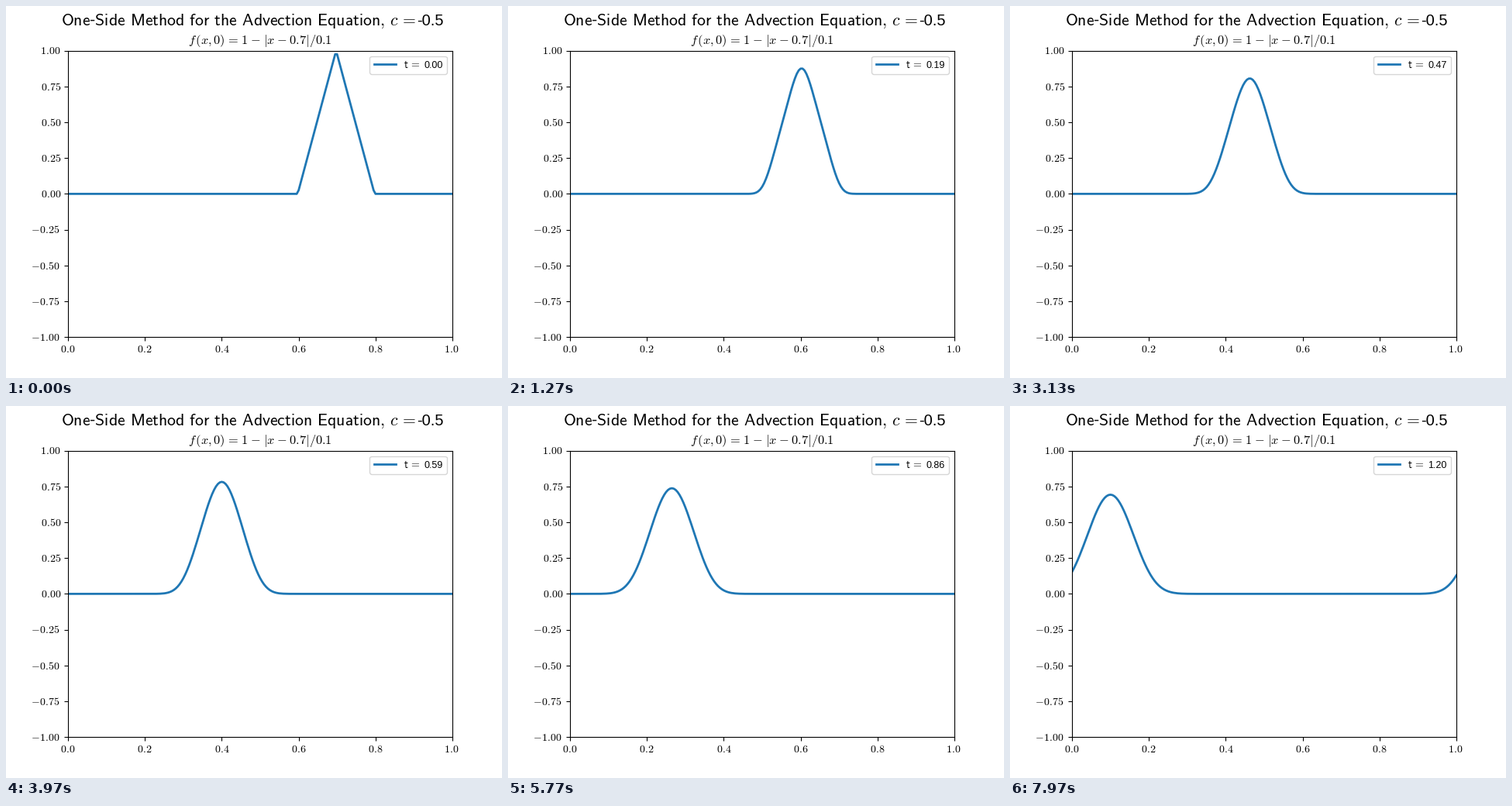
Write a matplotlib script that moves like this. It is 640 by 480 pixels and loops after 8.01 s.

```python
import numpy as np
import matplotlib.pyplot as plt
from matplotlib.animation import FuncAnimation
from matplotlib.lines import Line2D
from matplotlib.patches import FancyBboxPatch
from matplotlib.transforms import IdentityTransform

W, H, DPI = 640, 480, 100
EM = 10 * DPI / 72  # 10 pt in pixels
plt.rcParams.update({
    "font.family": "Liberation Sans",
    "mathtext.fontset": "cm",
})

# Advection equation solved with the one-sided scheme on a periodic grid
C, POINTS, STEPS, DT, DX = -0.5, 201, 240, 0.005, 0.005
FRAMES, INTERVAL = 267, 30

x = np.arange(POINTS) * DX
times = np.arange(STEPS) * DT


def solve():
    f = np.maximum(0, 1 - np.abs(x + DX / 2 - 0.7) / 0.1)
    states = [f]
    for _ in range(STEPS - 1):
        f = f - C * DT / DX * (np.roll(f, -1) - f)
        states.append(f)
    return states


states = solve()

fig, ax = plt.subplots(figsize=(W / DPI, H / DPI), dpi=DPI)


def put(px, py, text, size, **kw):
    """Text with its baseline at a pixel position measured from the top left."""
    return fig.text(px / W, 1 - py / H, text, fontsize=size, va="baseline", **kw)


def sans(*words):
    return r"\hspace{0.38}".join(rf"\mathsf{{{w}}}" for w in words)


def put_number(px, py, text, align):
    """Tick number whose box ends (align=1) or is centred (align=0.5) at px."""
    advance = {"-": 0.778, ".": 0.278}
    width = sum(advance.get(c, 0.5) for c in text) * EM
    bearing = {"-": 2, "1": 1}.get(text[0], 0)
    left = round(px - align * width) - bearing - 1
    # the half-pixel lead makes glyph positions round instead of truncate
    put(left, py, rf"$\hspace{{0.04}}{{{text}}}$", 10)


# Axes
xticks = np.linspace(0, 1, 6)
yticks = np.linspace(-1, 1, 9)
ax.set(xlim=(0, 1), ylim=(-1, 1), xticks=xticks, yticks=yticks)
ax.tick_params(labelbottom=False, labelleft=False)
for v in xticks:
    px, py = ax.transData.transform((v, -1))
    put_number(px, H - py + 19.36, f"{v:.1f}", 0.5)
for v in yticks:
    px, py = ax.transData.transform((0, v))
    put_number(px - 9.72, H - py + 4.82, f"{v:.2f}", 1)

# Headings
tail = sans("Side", "Method", "for", "the", "Advection", "Equation,")
put(70.8, 25, rf"$\mathsf{{One}}$-${tail}\hspace{{0.18}}c\hspace{{0.116}}=$", 15.6)
put(564.7, 25, "-0.5", 14.5, ha="right")

equals = r"\hspace{0.116}=\hspace{0.116}"
minus = r"\hspace{0.052}-\hspace{0.052}"
ax.set_title(rf"$f\hspace{{0.12}}(x,0){equals}1{minus}|x{minus}0.7|/0.1$",
             fontsize=11.75)

curve, = ax.plot(x, states[0], color="C0", lw=2)

# Legend
pixels = IdentityTransform()
fig.add_artist(FancyBboxPatch(
    (469.4, H - 88), 99.7, 23.5, boxstyle="round,pad=0,rounding_size=2.78",
    fc="white", ec="0.8", lw=1, alpha=0.8, snap=True, zorder=1, transform=pixels))
fig.add_artist(Line2D([475, 502.8], [H - 74.9] * 2, color="C0", lw=2,
                      zorder=2, transform=pixels))
put(512.9, 80, r"$\mathsf{t}\hspace{0.179}=$", 10)
clock = put(539, 80, "0.00", 9)


def update(k):
    # 30 solver steps per second, sampled on a 30 ms clock
    n = min((18 * k + 15) // 20, STEPS - 1)
    curve.set_ydata(states[n])
    clock.set_text(f"{times[n]:.2f}")
    return curve, clock


anim = FuncAnimation(fig, update, frames=FRAMES, interval=INTERVAL,
                     repeat=True, repeat_delay=0, blit=False)
plt.show()
```
